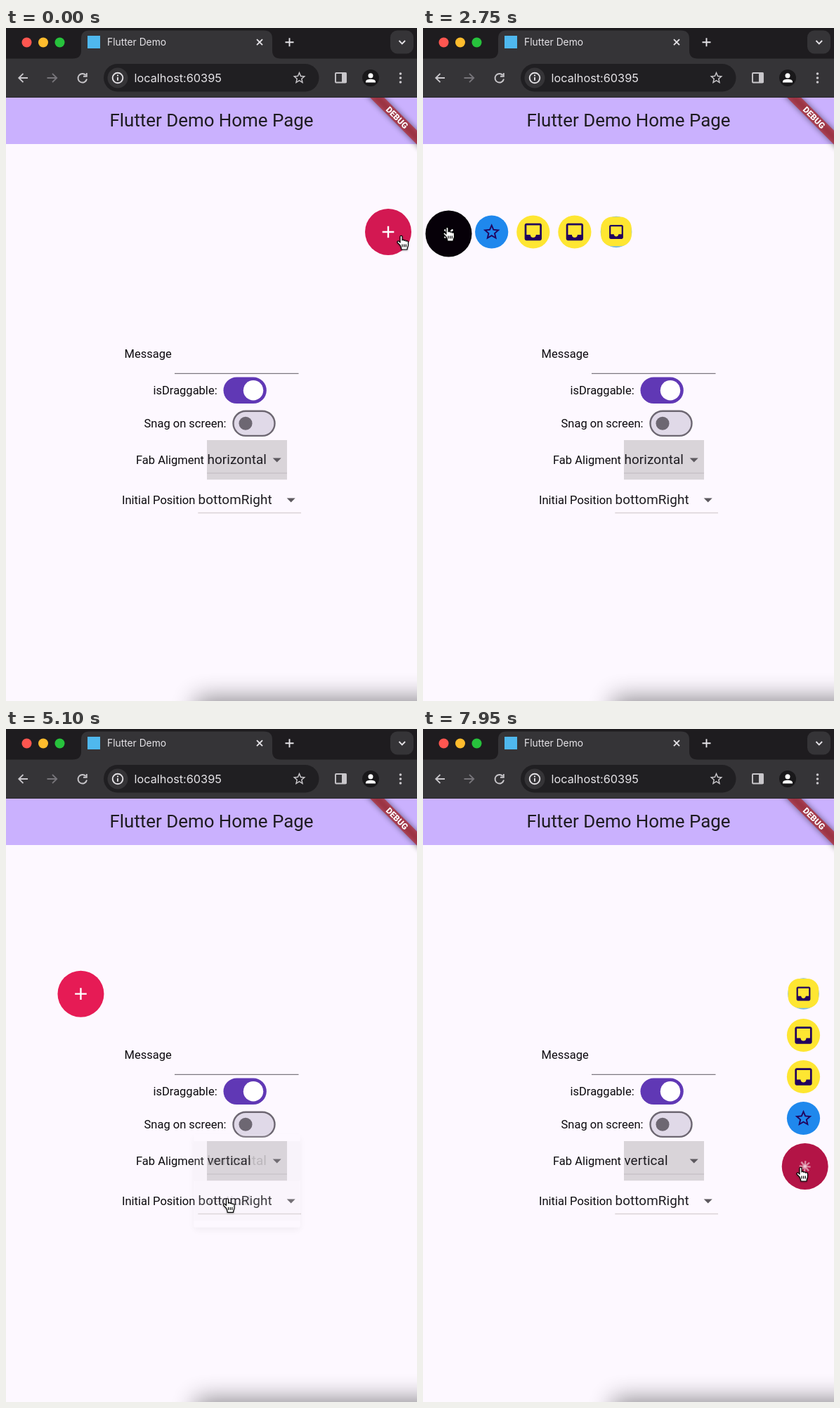
Recreate the animation shown at these times as an HTML page. Size 585 by 957 pixels, loop 8000 ms.

```html
<!DOCTYPE html>
<html lang="en">
<head>
<meta charset="utf-8">
<title>Flutter Demo</title>
<style>
  html, body { margin: 0; width: 100%; height: 100%; overflow: hidden; background: #fdf8ff; }
  svg { display: block; width: 585px; height: 957px; }
  text { font-family: Roboto, sans-serif; fill: #1d1b20; white-space: pre; }
  .chrome { font-family: Inter, sans-serif; fill: #e6e4e8; }
  .label { font-size: 16.5px; fill: #0c0a0e; }
  .value { font-size: 18.85px; letter-spacing: .1px; }
  .line { fill: none; stroke: #c9c7cb; stroke-width: 1.9; }
</style>
</head>
<body>
<svg id="stage" viewBox="0 0 585 957" xmlns="http://www.w3.org/2000/svg">
  <defs>
    <filter id="blur4" x="-50%" y="-100%" width="200%" height="300%"><feGaussianBlur stdDeviation="4"/></filter>
    <filter id="blur18" x="-20%" y="-200%" width="140%" height="500%"><feGaussianBlur stdDeviation="17"/></filter>
    <filter id="menuShadow" x="-20%" y="-20%" width="140%" height="150%">
      <feDropShadow dx="0" dy="4" stdDeviation="5" flood-opacity=".3"/>
    </filter>
    <filter id="cursorShadow" x="-50%" y="-50%" width="200%" height="200%">
      <feDropShadow dx="0" dy="1" stdDeviation="1" flood-opacity=".35"/>
    </filter>
    <clipPath id="page"><rect y="99" width="585" height="858"/></clipPath>
    <clipPath id="field"><rect x="286" y="586" width="114" height="56.5"/></clipPath>
    <clipPath id="menuClip"><rect id="menuMask" x="267" width="152"/></clipPath>
    <path id="star" d="M22 9.24l-7.19-.62L12 2 9.19 8.63 2 9.24l5.46 4.73L5.82 21 12 17.27 18.18 21l-1.63-7.03L22 9.24zM12 15.4l-3.76 2.27 1-4.28-3.32-2.88 4.38-.38L12 6.1l1.71 4.04 4.38.38-3.32 2.88 1 4.28L12 15.4z"/>
    <path id="inbox" d="M19 3H5C3.9 3 3 3.9 3 5V19C3 20.1 3.9 21 5 21H19C20.1 21 21 20.1 21 19V5C21 3.9 20.1 3 19 3zM19 15H15C15 16.7 13.7 18 12 18S9 16.7 9 15H5V5H19z"/>
    <path id="plus" d="M-8.3 0H8.3M0-8.3V8.3" fill="none" stroke="#fff" stroke-width="2.4"/>
  </defs>

  <!-- page -->
  <rect width="585" height="957" fill="#fdf8ff"/>
  <rect x="270" y="953" width="420" height="60" fill="#000" opacity=".45" filter="url(#blur18)"/>
  <rect y="99" width="585" height="66" fill="#cab1fe"/>
  <text x="292.5" y="140" font-size="25.9" text-anchor="middle">Flutter Demo Home Page</text>

  <g clip-path="url(#page)">
    <g transform="translate(585 99) rotate(45)">
      <rect x="-60" y="33" width="120" height="14.2" opacity=".5" filter="url(#blur4)"/>
      <rect x="-60" y="33" width="120" height="14.2" fill="#b71c1c" fill-opacity=".63"/>
      <text y="44.4" font-size="12" font-weight="900" text-anchor="middle" style="fill:#fff">DEBUG</text>
    </g>
  </g>

  <text class="label" x="168.5" y="469">Message</text>
  <path d="M240 491.3H416.5" stroke="#7d7880" stroke-width="1.3"/>
  <text class="label" x="209.5" y="521">isDraggable:</text>
  <rect x="309.5" y="496.5" width="61.3" height="37.6" rx="18.8" fill="#6038b5"/>
  <circle cx="352" cy="515.3" r="14.2" fill="#fff"/>
  <text class="label" x="196.5" y="568">Snag on screen:</text>
  <rect x="323.5" y="544.7" width="59" height="35.2" rx="17.6" fill="#e0d9e8" stroke="#6d6772" stroke-width="2.4"/>
  <circle cx="341" cy="562.3" r="9.5" fill="#6d6772"/>
  <text class="label" x="185" y="620">Fab Aligment</text>
  <g clip-path="url(#field)">
    <rect id="fieldBg" x="286" y="586" width="114" height="56.5"/>
    <circle id="splash" cx="307" cy="614" fill="#000" fill-opacity=".035"/>
  </g>
  <path d="M286 633H400" stroke="#bfbabf" stroke-width="1.2"/>
  <text id="value" class="value" x="286.5" y="620"></text>
  <path d="M379.7 611.5h12l-6 6z" fill="#5d595f"/>
  <text class="label" x="165" y="677">Initial Position</text>
  <text class="value" x="273.5" y="677">bottomRight</text>
  <path d="M399.7 668.5h12l-6 6z" fill="#5d595f"/>
  <path d="M273.3 689.5H420" stroke="#d9d2d6" stroke-width="1.3"/>

  <g id="kids"></g>
  <g id="fab">
    <circle id="disc" r="33"/>
    <use id="add" href="#plus"/>
    <use id="close" href="#plus"/>
  </g>

  <g id="menu">
    <rect id="menuBox" x="267.5" width="151" rx="2.4" fill="#fdf8ff" filter="url(#menuShadow)"/>
    <g clip-path="url(#menuClip)">
      <rect x="267.5" y="586" width="151" height="56.6" fill-opacity=".12"/>
      <rect id="rowHover" x="267.5" y="642.6" width="151" height="56.6" fill-opacity=".05"/>
      <text class="value" x="286.5" y="620">horizontal</text>
      <text class="value" x="286.5" y="677">vertical</text>
    </g>
  </g>

  <!-- browser -->
  <rect width="585" height="99" fill="#1e1c1f"/>
  <path d="M0 43.5H95Q107 43.5 107 32V15Q107 3.5 119 3.5H367Q379 3.5 379 15V32Q379 43.5 391 43.5H585V98.5H0Z" fill="#353437"/>
  <circle cx="29.5" cy="20.5" r="7" fill="#fe5650"/>
  <circle cx="53" cy="20.5" r="7" fill="#febc2d"/>
  <circle cx="76.5" cy="20.5" r="7" fill="#27c23c"/>
  <rect x="116" y="11" width="18" height="18" fill="#4fb8ee"/>
  <text class="chrome" x="144" y="25" font-size="13.8">Flutter Demo</text>
  <path class="line" d="M357 16.200l8 8m0-8l-8 8M397.500 20.200h12m-6-6v12" style="stroke:#e4e2e6"/>
  <rect x="547" y="3.500" width="33" height="33" rx="10" fill="#353437"/>
  <path class="line" d="M559.500 18l4.300 4.300 4.300-4.300" style="stroke:#e4e2e6"/>
  <path class="line" d="M31 71H18.500m6-6.200L18.300 71l6.200 6.200"/>
  <path class="line" d="M58.500 71H72m-6-6.200L72.200 71 66 77.200" style="stroke:#77757a"/>
  <path class="line" d="M113.500 67A6.300 6.300 0 1 0 115 72.500M114.800 64v4.800H110"/>
  <rect x="139" y="51" width="306.500" height="39.500" rx="19.700" fill="#201f22"/>
  <circle cx="159" cy="71" r="14.500" fill="#353437"/>
  <circle class="line" cx="159" cy="71" r="7.300" style="stroke:#e4e2e6"/>
  <path class="line" d="M159 70v4.800M159 66.500v2" style="stroke:#e4e2e6"/>
  <text class="chrome" x="182.500" y="76.700" font-size="16.300">localhost:60395</text>
  <use href="#star" fill="#c9c7cb" transform="translate(406.700 60) scale(.9)"/>
  <rect class="line" x="469" y="64" width="15" height="13.500" rx="1"/>
  <path d="M478 63.500h6.500v14.500H478z" fill="#c9c7cb"/>
  <circle cx="519" cy="71" r="12" fill="#19181a"/>
  <circle cx="519" cy="67.700" r="3.500" fill="#fff"/>
  <path d="M512 77.500v-1.500c0-4.500 14-4.500 14 0v1.500z" fill="#fff"/>
  <g fill="#c9c7cb"><circle cx="561.500" cy="65" r="1.800"/><circle cx="561.500" cy="71" r="1.800"/><circle cx="561.500" cy="77" r="1.800"/></g>

  <g id="cursor" filter="url(#cursorShadow)">
    <g id="hand" transform="translate(-6 -1)" fill="#fff" stroke="#000" stroke-width="1.2" stroke-linejoin="round">
      <path d="M5 14L1.500 10.500C0 9 2 7.300 3.300 8.400L5 10V1.800C5-.2 8-.2 8 1.800V7C8 5.800 10.800 5.800 10.800 7.400C11 6.400 13.400 6.600 13.400 8.200C13.800 7.400 16.500 7.800 16.500 9.400V13C16.500 16 15 16.500 15 20H6.800C6.800 17 5.500 15.500 5 14Z"/>
      <path d="M8 12.500v4M10.700 12.500v4M13.300 12.500v4" fill="none"/>
    </g>
    <path id="arrow" d="M0 0V16.200L3.700 12.700 6.300 18.500 9 17.300 6.500 11.700H11.500Z" fill="#000" stroke="#fff" stroke-width="1.200"/>
  </g>
</svg>
<script>
const LOOP = 8000;
const el = id => document.getElementById(id);
const set = (id, attrs) => {
  for (const k in attrs) el(id).setAttribute(k, attrs[k]);
};
const ramp = (t, a, b) => {
  const p = Math.min(1, Math.max(0, (t - a) / (b - a)));
  return p * p * (3 - 2 * p);
};
const within = (t, a, b) => t >= a && t < b;
const show = (id, on) => set(id, { visibility: on ? 'visible' : 'hidden' });
const mix = (a, b, p) => `rgb(${a.map((v, i) => Math.round(v + (b[i] - v) * p))})`;

// Eased position along [time, x, y] keys.
function track(keys, t) {
  let i = 0;
  while (i < keys.length - 2 && t >= keys[i + 1][0]) i++;
  const [a, x, y] = keys[i], [b, u, v] = keys[i + 1];
  const p = ramp(t, a, b);
  return [x + (u - x) * p, y + (v - y) * p];
}

const fabPath = [
  [350, 544, 290], [1450, 40, 293], [1720, 40, 293], [1850, 36.5, 292.5],
  [5030, 36.5, 292.5], [5330, 543.7, 902.7], [6250, 543.7, 902.7],
  [6780, 542, 622], [7250, 542, 622], [7350, 543.7, 622]
];
const cursorPath = [
  [350, 562, 296], [1450, 58, 299], [2000, 58, 299], [2200, 34, 284],
  [3500, 34, 284], [4080, 310, 618], [4450, 310, 618], [4800, 314, 668],
  [5080, 314, 668], [5750, 505, 849], [5850, 505, 849], [6180, 539, 905],
  [6250, 539, 905], [6780, 537, 624]
];
const PINK = [230, 27, 85], HOVER = [211, 24, 82], OPEN = [6, 0, 8];

function child(i, x, y) {
  const last = i === 3;
  const icon = i ? 'inbox' : 'star';
  const scale = last ? 1.1 : i ? 1.35 : 1.18;
  const base = last
    ? '<circle r="22.3" fill="#73b9e8"/><rect x="-21.800" y="-21.500" width="43.600" height="41.800" rx="16" fill="#fee632"/>'
    : `<circle r="23.600" fill="${i ? '#fee632' : '#1f88ed'}"/>`;
  return `<g transform="translate(${x} ${y})">${base}
    <use href="#${icon}" fill="#21005d" transform="scale(${scale}) translate(-12 -12)"/></g>`;
}
let layout = '';
function layKids(vertical) {
  const next = vertical ? 'v' : 'h';
  if (next === layout) return;
  layout = next;
  el('kids').innerHTML = [0, 1, 2, 3].map(i =>
    vertical ? child(i, 541.5, 553.5 - 59 * i) : child(i, 97.7 + 59.1 * i, 290)).join('');
}

function drawFab(t) {
  const [x, y] = track(fabPath, t);
  const hover = ramp(t, 2130, 2200) - ramp(t, 3560, 3640) + ramp(t, 6080, 6150) + 1 - ramp(t, 1350, 1450);
  const open = ramp(t, 2300, 2500) - ramp(t, 3150, 3350) + ramp(t, 7900, 8100);
  const turn = ramp(t, 2300, 2400) - ramp(t, 3150, 3250) + ramp(t, 7900, 8000);
  const base = PINK.map((v, i) => v + (HOVER[i] - v) * hover);
  set('fab', { transform: `translate(${x} ${y})` });
  set('disc', { fill: mix(base, OPEN, open) });
  set('add', { opacity: 1 - turn, transform: `rotate(${turn * 10}) scale(${1 - turn * .1})` });
  set('close', { opacity: turn, transform: `rotate(${45 + (1 - turn) * 10})` });
  layKids(t > 5000);
  show('kids', within(t, 2320, 3200) || t >= 7920);
}

function drawField(t) {
  const hover = ramp(t, 3980, 4060) - ramp(t, 4300, 4400);
  set('fieldBg', { fill: mix([217, 212, 217], [201, 198, 202], hover) });
  set('splash', { r: within(t, 4120, 4500) ? 14 + 12 * ramp(t, 4120, 4320) : 0 });
  el('value').textContent = t < 5000 ? 'horizontal' : 'vertical';

  const fade = ramp(t, 4290, 4370) - ramp(t, 5010, 5130);
  const grow = ramp(t, 4330, 4530);
  const box = { y: 586 - 9.5 * grow, height: 56.6 + 75.5 * grow };
  set('menu', { opacity: fade });
  show('menu', fade > 0);
  set('menuBox', box);
  set('menuMask', box);
  show('rowHover', fade > 0 && t > 4680);
}

function drawCursor(t) {
  const [x, y] = track(cursorPath, t);
  const arrow = within(t, 3580, 3980) || within(t, 5170, 6080);
  set('cursor', { transform: `translate(${x} ${y})` });
  set('hand', { opacity: arrow ? 0 : 1 });
  set('arrow', { opacity: arrow ? 1 : 0 });
  show('cursor', !within(t, 1550, 2000));
}

function draw(t) {
  drawFab(t);
  drawField(t);
  drawCursor(t);
}

let start;
function tick(now) {
  start ??= now;
  draw(Math.max(0, now - start) % LOOP);
  requestAnimationFrame(tick);
}
draw(0);
requestAnimationFrame(tick);
</script>
</body>
</html>
```
